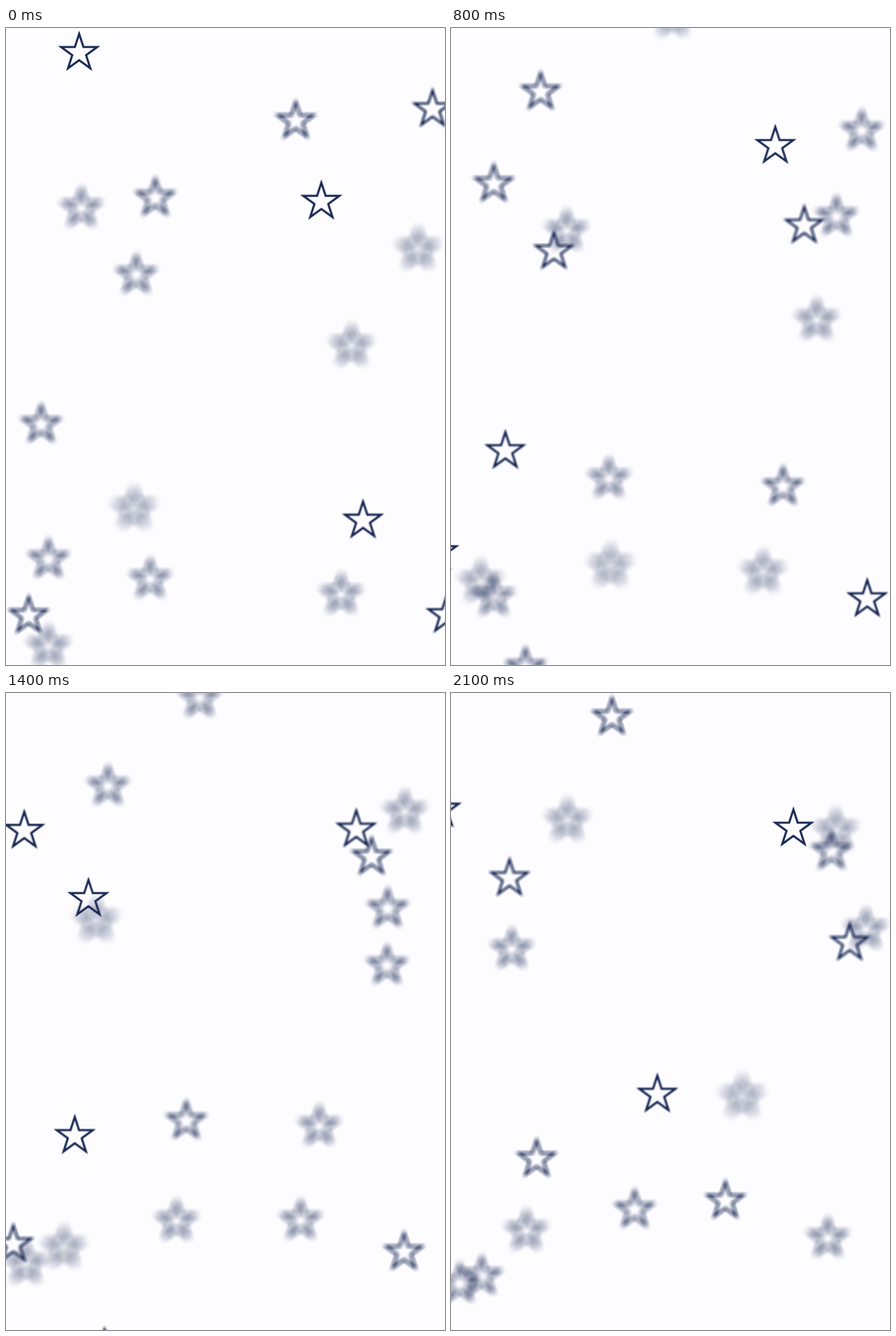
An HTML page with a canvas for the animation above (2.2 s loop, 600 by 869 pixels).

```html
<!DOCTYPE html>
<html lang="en">
<head>
<meta charset="utf-8">
<title>Drifting stars</title>
<style>
  html, body { margin: 0; width: 100%; height: 100%; overflow: hidden; background: #fdfcff; }
  canvas { display: block; }
</style>
</head>
<body>
<canvas id="sky" width="600" height="869"></canvas>
<script>
const LOOP = 2200, STEP = 100, SPAN = 2100;
const INK = "#1a2a55", RADIUS = 26, LINE = 2.6;
const MAX_BLUR = 5.7, SAMPLES = 32, SPRITE = 140;

// Where each star starts and ends (x, y, x, y), sorted by starting depth.
const drifts = [
  [354, -47, 220, 31],
  [472, 432, 545, 339],
  [175, 654, 282, 546],
  [563, 300, 468, 183],
  [58, 842, 173, 917],
  [103, 244, -14, 157],
  [178, 335, 80, 251],
  [48, 539, 117, 634],
  [396, 125, 520, 214],
  [-54, 663, 42, 794],
  [602, 799, 515, 742],
  [431, 235, 567, 321],
  [100, 32, 159, 172],
  [488, 670, 398, 549],
  [583, 109, 526, 186],
  [31, 800, 103, 732],
  [204, 230, 83, 348],
  [58, 723, 12, 804],
  [197, 750, 251, 703],
  [458, 771, 375, 691]
];

const sky = document.getElementById("sky").getContext("2d");
const sprite = document.createElement("canvas");
sprite.width = sprite.height = SPRITE;
const pen = sprite.getContext("2d");

const mix = (a, b, u) => a + (b - a) * u;

const starShape = new Path2D("M" + Array.from({ length: 10 }, (_, i) => {
  const r = i % 2 ? RADIUS * 0.382 : RADIUS;
  const a = i * Math.PI / 5;
  return `${r * Math.sin(a)} ${2 - r * Math.cos(a)}`;
}).join("L") + "Z");

// Depth zero is in focus; depth travels at one speed for every star.
function blurAt(index, u) {
  const depth = Math.abs(-7 + 0.6 * index + 4.9 * u);
  return depth > MAX_BLUR ? 2 * MAX_BLUR - depth : depth;
}

// Lens blur: add up faint copies spread evenly over a disc, then tint the sum.
function paintSprite(blur) {
  pen.globalAlpha = 1;
  pen.clearRect(0, 0, SPRITE, SPRITE);
  pen.lineWidth = LINE;
  pen.globalCompositeOperation = "lighter";
  pen.globalAlpha = 9 / 255;
  for (let k = 0; k < SAMPLES; k++) {
    const r = 2 * blur * Math.sqrt((k + 0.5) / SAMPLES);
    const a = k * 2.39996;
    pen.save();
    pen.translate(SPRITE / 2 + r * Math.cos(a), SPRITE / 2 + r * Math.sin(a));
    pen.stroke(starShape);
    pen.restore();
  }
  pen.globalAlpha = 1;
  pen.globalCompositeOperation = "source-in";
  pen.fillStyle = INK;
  pen.fillRect(0, 0, SPRITE, SPRITE);
  pen.globalCompositeOperation = "source-over";
}

function draw(u) {
  sky.clearRect(0, 0, 600, 869);
  drifts.forEach(([x0, y0, x1, y1], i) => {
    const blur = blurAt(i, u);
    paintSprite(blur);
    sky.filter = `blur(${0.2 + 0.25 * blur}px)`;
    sky.drawImage(sprite, mix(x0, x1, u) - SPRITE / 2, mix(y0, y1, u) - SPRITE / 2);
  });
}

const start = performance.now();
let shown = -1;
function tick() {
  const step = Math.floor(((performance.now() - start) % LOOP) / STEP);
  if (step !== shown) draw(step * STEP / SPAN);
  shown = step;
  requestAnimationFrame(tick);
}
tick();
</script>
</body>
</html>
```
